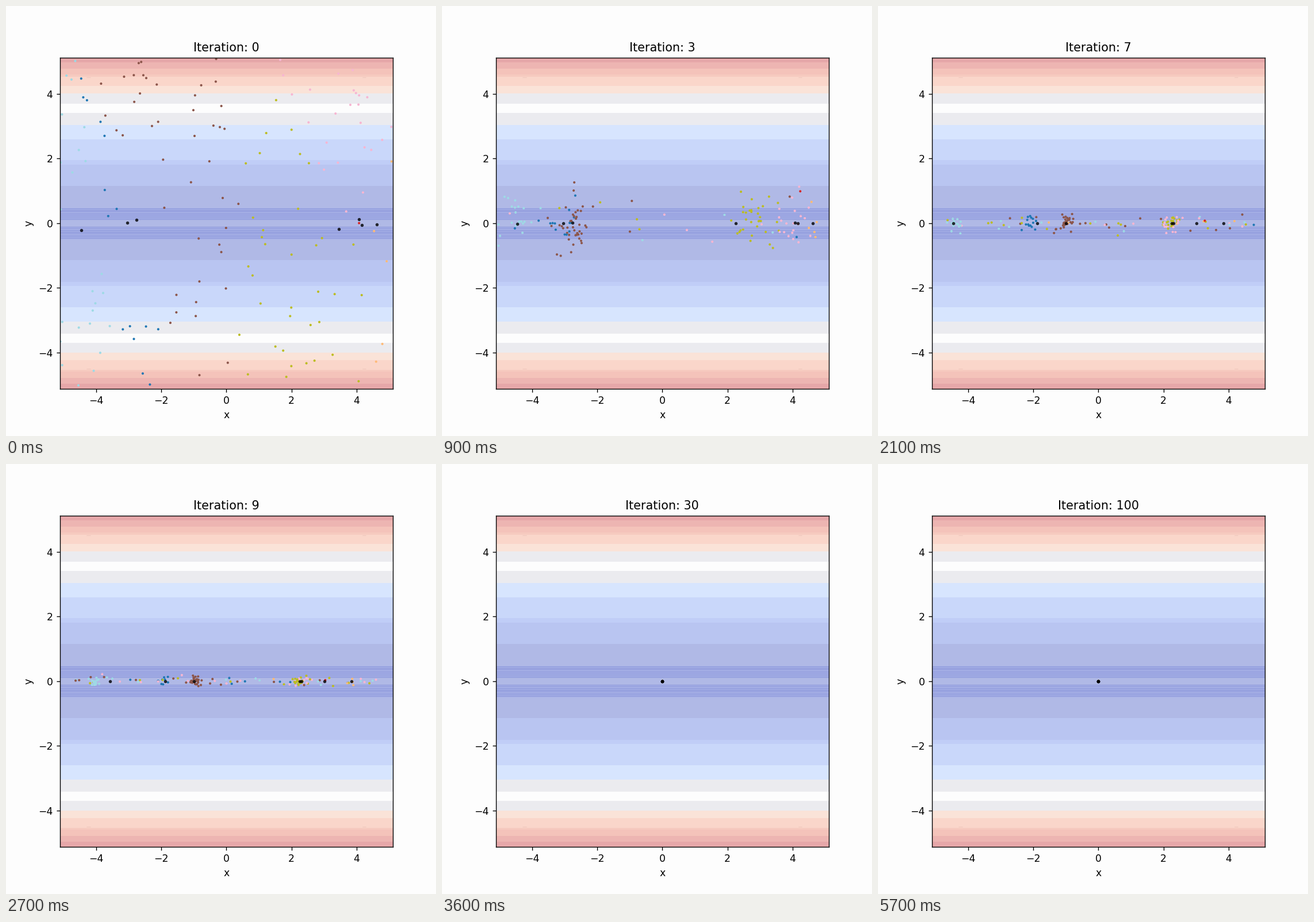
These frames come from a looping animation (748 px wide and 748 px high, 6 s). A matplotlib script:

```python
from collections import namedtuple

import numpy as np
import matplotlib.pyplot as plt
from matplotlib.animation import FuncAnimation

LIM = 5.12
POINTS = 150
ITERATIONS = [*range(10), *range(10, 101, 10)]

# Outer half-height and colour of each contour band, from the outside in.
BANDS = [
    (5.12, "#e6a7a9"), (4.97, "#edb5b2"), (4.78, "#f4c3ba"), (4.60, "#f6cabf"),
    (4.53, "#fad6ca"), (4.24, "#fae3d8"), (4.01, "#ebebef"), (3.70, "#fdfdfd"),
    (3.41, "#ebebef"), (3.04, "#d7e5fe"), (2.60, "#c9d7fa"), (1.95, "#c0cdf7"),
    (1.81, "#b9c5f1"), (1.15, "#b0b9e6"), (0.47, "#a3ade6"), (0.12, "#b0b9e6"),
]

# Each leader holds its start and jumps along the valley at one iteration.
Swarm = namedtuple("Swarm", "colour x y end jump")
SWARMS = [
    Swarm("#9edae5", -4.45, -0.22, -3.57, 9),
    Swarm("#1f77b4", -3.05, 0.01, -1.88, 6),
    Swarm("#8c564b", -2.76, 0.10, -1.00, 5),
    Swarm("#bcbd22", 3.46, -0.19, 2.25, 3),
    Swarm("#f7b6d2", 4.07, 0.12, 2.30, 5),
    Swarm("#d62728", 4.16, -0.05, 3.01, 5),
    Swarm("#ffbb78", 4.62, -0.04, 3.84, 6),
]
HEADS = np.array([(s.x, s.y) for s in SWARMS])
ENDS = np.array([s.end for s in SWARMS])
JUMPS = np.array([s.jump for s in SWARMS])

STARTS = np.random.default_rng(12).uniform(-LIM, LIM, (POINTS, 2))
# Every point follows the leader it starts nearest to.
OWNER = ((STARTS[:, None] - HEADS) ** 2).sum(axis=2).argmin(axis=1)
COLOURS = [SWARMS[i].colour for i in OWNER]


def smooth(u):
    u = np.clip(u, 0, 1)
    return u * u * (3 - 2 * u)


def collapse(it):
    """Scale of the whole picture as the swarms meet at the origin."""
    return 1 if it <= 10 else 0.16 if it < 30 else 0


def swarm_points(it):
    rng = np.random.default_rng(70 + it)
    age = np.clip(it - 3, 0, 6)
    moved = smooth((it - JUMPS + 2) / 4)
    centre = HEADS[:, 0] + (ENDS - HEADS[:, 0]) * moved

    x = centre[OWNER] + 0.3 * np.exp(-0.15 * age) * rng.normal(size=POINTS)
    y = 0.42 * np.exp(-0.29 * age) * np.clip(rng.normal(size=POINTS), -3, 3)
    stray = rng.random(POINTS) < 0.16 + 0.04 * age
    x = np.where(stray, rng.uniform(-4.7, 4.9, POINTS), x)

    gathered = min(it / 3, 1) ** 1.5
    target = np.column_stack([x, y]) * collapse(it)
    return STARTS * (1 - gathered) + target * gathered


def leader_points(it):
    x = np.where(it >= JUMPS, ENDS, HEADS[:, 0])
    return np.column_stack([x, HEADS[:, 1] * 0.4 ** it]) * collapse(it)


def draw_landscape(ax):
    inner = [h for h, _ in BANDS[1:]] + [0]
    for (outer, colour), low in zip(BANDS, inner):
        for a, b in ((low, outer), (-outer, -low)):
            ax.axhspan(a, b, color=colour, lw=0, antialiased=False, zorder=0)
    ridges = np.linspace(0.12, 0.46, 8)
    for side in (1, -1):
        ax.hlines(side * ridges, -LIM, LIM, color="#8f9adb", lw=0.58, zorder=1)
        ax.hlines(side * (ridges[1::3] + 0.02), -LIM, LIM, color="#adb6e8",
                  lw=0.58, zorder=1)
        for x in (-4.29, 4.18):
            ax.hlines(side * 4.505, x, x + 0.11, color="#efc6bc", lw=0.58, zorder=1)


fig, ax = plt.subplots(figsize=(6, 6), dpi=748 / 6, facecolor="#fdfdfd")
draw_landscape(ax)
ax.set(xlim=(-LIM, LIM), ylim=(-LIM, LIM), xlabel="x", ylabel="y",
       xticks=range(-4, 5, 2), yticks=range(-4, 5, 2))
title = ax.set_title("Iteration: 0")
swarm = ax.scatter(*swarm_points(0).T, s=5.6, c=COLOURS, lw=0, zorder=2)
leaders = ax.scatter(*leader_points(0).T, s=10, c="black", alpha=0.8, lw=0, zorder=3)


def update(frame):
    it = ITERATIONS[frame]
    title.set_text(f"Iteration: {it}")
    swarm.set_offsets(swarm_points(it))
    leaders.set_offsets(leader_points(it))
    return title, swarm, leaders


anim = FuncAnimation(fig, update, frames=len(ITERATIONS), interval=300,
                     repeat=True, repeat_delay=0, blit=False)
plt.show()
```
